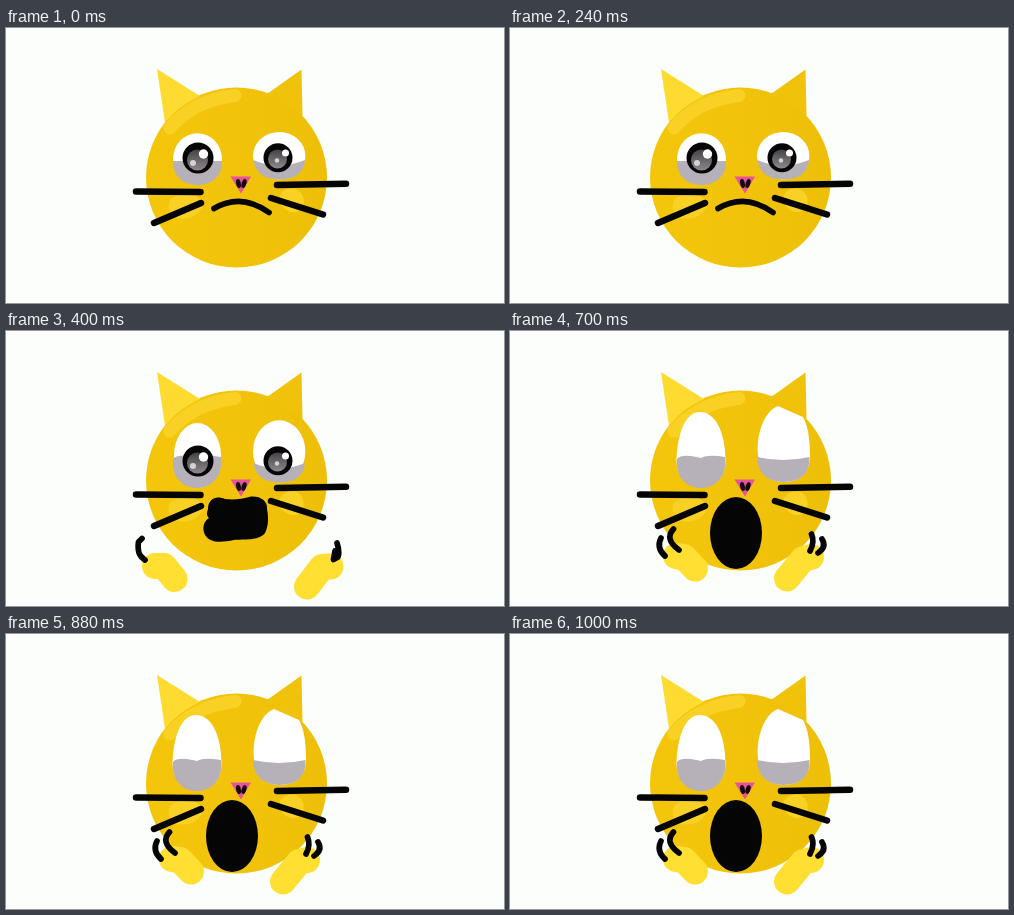
Write an HTML page that moves like this. It is 498 by 275 pixels and loops after 1.3 s.

```html
<!DOCTYPE html>
<html lang="en">
<head>
<meta charset="utf-8">
<title>Shocked cat</title>
<style>
  html, body { margin: 0; width: 100%; height: 100%; overflow: hidden; background: #fcfefc; }
  svg { display: block; width: 100vw; height: 100vh; }
  .line { fill: none; stroke: #050505; stroke-linecap: round; stroke-linejoin: round; }
  .paw { fill: none; stroke: #fedf32; stroke-width: 26; stroke-linecap: round; stroke-linejoin: round; }
</style>
</head>
<body>
<svg viewBox="0 0 498 275">
  <defs>
    <linearGradient id="fur">
      <stop offset="0" stop-color="#f4c60b"/>
      <stop offset="1" stop-color="#eebf08"/>
    </linearGradient>
    <linearGradient id="iris" x2="0" y2="1">
      <stop offset="0" stop-color="#454245"/>
      <stop offset="1" stop-color="#8d888c"/>
    </linearGradient>
  </defs>

  <ellipse cx="230.500" cy="149.500" rx="90.500" ry="90" fill="url(#fur)"/>
  <path d="M151 41L194 68Q172 78 159 95Z" fill="#fedb30"/>
  <path d="M295.500 41.500L261 66L296.500 88Z" fill="#f0c20a"/>
  <path d="M164 100Q188 72 229 67.500" fill="none" stroke="#f9d124" stroke-width="13" stroke-linecap="round"/>
  <path d="M164 172Q172 164 186 167Q198 170 196 180Q188 193 171 190Q159 183 164 172Z
           M274 167Q279 159 290 161Q300 166 297 178Q292 187 282 183Q271 177 274 167Z" fill="#f9d124"/>

  <path id="whites" fill="#fff"/>
  <path id="bags" fill="#b6b0b9"/>
  <g id="pupils">
    <circle cx="192" cy="130" r="15.500" fill="#050505"/>
    <circle cx="191.500" cy="132" r="10.500" fill="url(#iris)"/>
    <circle cx="187" cy="135" r="3" fill="#d5d2d5"/>
    <circle cx="197.500" cy="126" r="4.700" fill="#fff"/>
    <circle cx="272" cy="129.700" r="14.500" fill="#050505"/>
    <circle cx="271.500" cy="131" r="9.500" fill="url(#iris)"/>
    <circle cx="271" cy="132.500" r="2.200" fill="#d5d2d5"/>
    <circle cx="279.500" cy="125" r="3.500" fill="#fff"/>
  </g>

  <path d="M224.500 148.500L245 148.500L235 165.500Z" fill="#e9529c"/>
  <ellipse cx="232.500" cy="155.500" rx="2.300" ry="4.500" fill="#14060e" transform="rotate(-12 232.500 155.500)"/>
  <ellipse cx="238" cy="155.500" rx="2.300" ry="4.500" fill="#14060e" transform="rotate(18 238 155.500)"/>

  <path id="mouth" class="line"/>
  <path id="leftPaw" class="paw"/>
  <path id="rightPaw" class="paw"/>
  <path id="marks" class="line" stroke-width="5.700"/>
  <path class="line" stroke-width="6.500" d="M130 163.500L194.500 164M148 195L195 175M271 157L340 155.800M265 170L317 186.500"/>
</svg>
<script>
const LOOP = 1300;
const $ = id => document.getElementById(id);
const oval = (cx, cy, rx, ry) =>
  `M${cx - rx} ${cy}a${rx} ${ry} 0 1 1 ${2 * rx} 0a${rx} ${ry} 0 1 1 ${-2 * rx} 0Z`;

// Grey halves under the eyes
const lowLeft = 'M167 133L216 133C217 165 166 165 167 133Z';
const highLeft = 'M167 128Q170 124 181 125Q187 126 191 127Q198 123 215 126C220 167 163 167 167 128Z';
const lowRight = 'M247.500 132Q272 143 299 132Q297 151.500 273 151.500Q250 151 247.500 132Z';
const highRight = 'M247 126Q273 132 299.500 126Q300 151 273 151Q248 150 247 126Z';

const sad = {
  whites: oval(191.5, 131, 24.5, 25.7) + oval(273.2, 127.7, 26.2, 23.7),
  bags: lowLeft + lowRight,
  mouth: 'M208 180.500Q235 164.500 263 184.500',
  pupils: true
};

const gasp = {
  whites: oval(191.5, 124.5, 23.5, 32.5) + oval(273.2, 120.3, 26.2, 31),
  bags: highLeft + lowRight,
  mouth: 'M202 178C202 168 210 164 219 168C228 169 236 168 243 166C252 164 262 169 261 178' +
    'C263 188 262 196 259 202C253 210 238 208 228 209C216 211 205 213 199 204' +
    'C195 196 199 189 203 187C200 184 201 181 202 178Z',
  open: true,
  pupils: true,
  leftPaw: 'M149 235L158 235L168.500 248',
  rightPaw: 'M324.500 235.500L316 236L301 255.500',
  marks: 'M136 207.500L132.500 211Q131 221 135.500 226L139 229M331 212Q334 221 332 226L327.500 228.500L329 220'
};

const scream = {
  whites: 'M166.500 128C168 100 176 81 190 81C205 81 215 100 215.500 128C217 165 165 165 166.500 128Z' +
    'M248 124C246 104 254 80 268 75L293 86Q300 98 300 126Q299 151 273 151Q247 149 248 124Z',
  bags: highLeft + highRight,
  mouth: oval(226, 202, 26, 36),
  open: true,
  leftPaw: 'M166 225L174 226L185 237.500',
  rightPaw: 'M301 226L293 228L277 247.500',
  marks: 'M151 207Q146 217 155 225M163.500 198Q154 208 169 219' +
    'M301.500 203Q305 211 300 220M312 208Q317 216 308 222'
};

function draw(time) {
  const t = time % LOOP;
  const pose = t < 400 ? sad : t < 700 ? gasp : scream;
  for (const id of ['whites', 'bags', 'mouth', 'leftPaw', 'rightPaw', 'marks'])
    $(id).setAttribute('d', pose[id] || '');
  $('mouth').style.fill = pose.open ? '#050505' : 'none';
  $('mouth').style.strokeWidth = pose.open ? 0 : 5.7;
  $('pupils').style.display = pose.pupils ? '' : 'none';
}

const start = performance.now();
function tick() {
  draw(performance.now() - start);
  requestAnimationFrame(tick);
}
tick();
</script>
</body>
</html>
```
